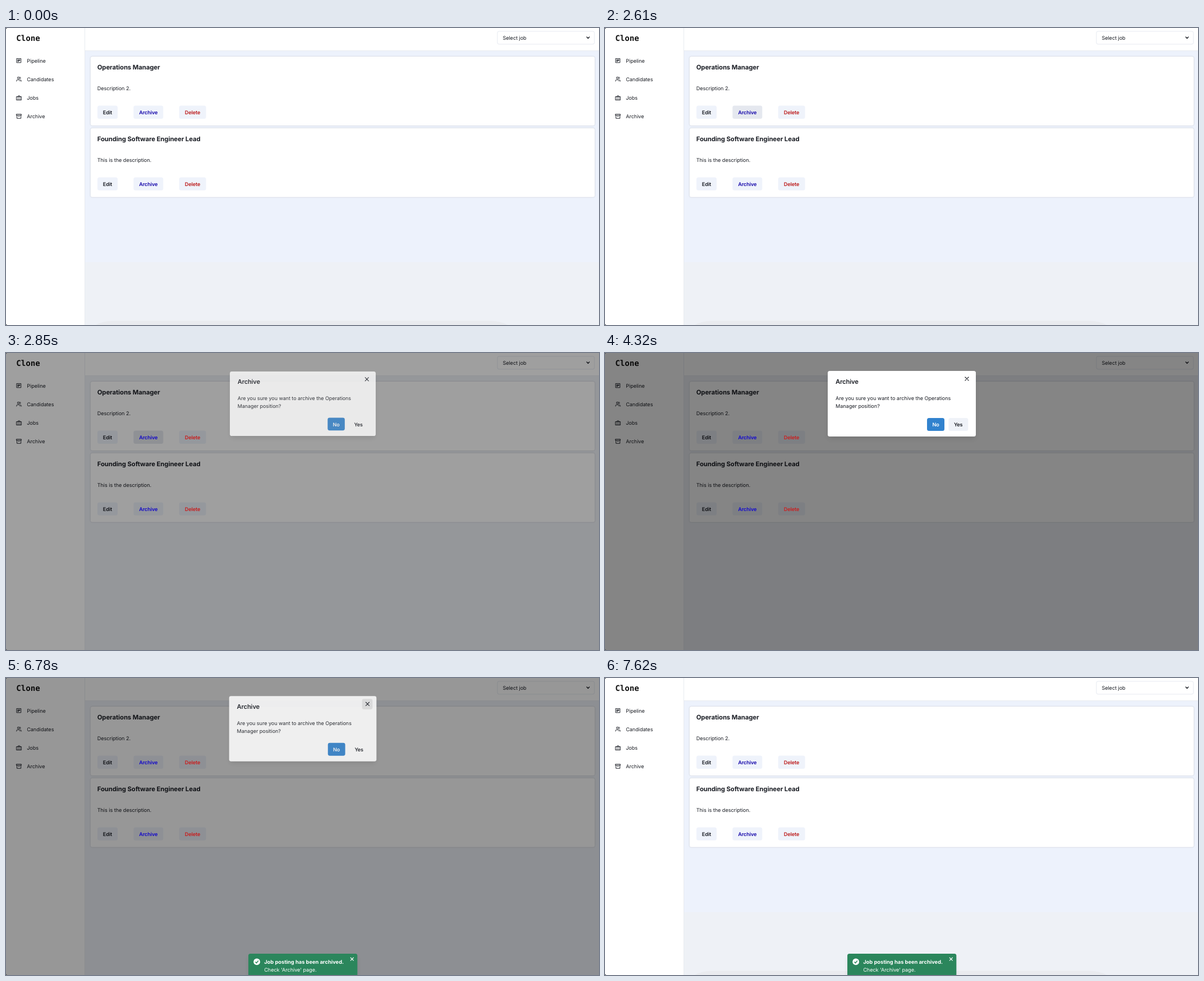
Write an HTML page that moves like this. It is 1057 px wide and 530 px high and loops after 8000 ms.

```html
<!DOCTYPE html>
<html lang="en">
<head>
<meta charset="utf-8">
<title>Job postings</title>
<style>
  html, body { margin: 0; width: 100%; height: 100%; overflow: hidden; background: #fff; }
  svg { display: block; width: 1057px; height: 530px; }
  text { font: 400 9.1px Inter, sans-serif; letter-spacing: -.035px; fill: #1a1d24; text-rendering: geometricPrecision; white-space: pre; }
  .b { font-weight: 600; letter-spacing: -.12px; }
  .h { font-size: 11.3px; font-weight: 700; letter-spacing: -.06px; }
  .title { font-size: 11.2px; font-weight: 600; letter-spacing: -.14px; }
  .alert { font-size: 9.3px; font-weight: 700; letter-spacing: 0; }
  .m { text-anchor: middle; }
  .logo { font: 700 14.1px "DejaVu Sans Mono", monospace; letter-spacing: 0; fill: #111; }
  .line { fill: none; stroke: #1a1d24; stroke-width: .95; stroke-linecap: round; stroke-linejoin: round; }
  .card { fill: #fff; filter: drop-shadow(0 .7px .8px rgba(0,0,0,.2)); }
  .btn { fill: #eff3fb; }
  .glow { filter: drop-shadow(0 5.9px 4.4px rgba(0,0,0,.12)); }
  #modal { transform-origin: 529px 90.5px; }
</style>
</head>
<body>
<svg viewBox="0 0 1057 530">
  <rect width="1057" height="530" fill="#fff"/>
  <rect id="ground" x="141" y="41" width="916" height="489"/>
  <g id="floor">
    <rect x="141" y="418" width="916" height="112" fill="#eef1f6"/>
    <path d="M160 530Q172 522.5 192 522.5H862Q882 522.5 894 530Z" fill="#e9ebef"/>
  </g>
  <path d="M140.5 0V530M141 40.5H1057" stroke="#e8ebf0" fill="none"/>

  <text class="logo" x="18.3" y="23">Clone</text>
  <g id="nav"></g>
  <g class="line">
    <path d="M19.3 54.5H26.7V61.8H19.3ZM21.3 56.6H22.4V59.8H21.3ZM23.9 56.6H24.9V58.2H23.9Z"/>
    <path d="M18.8 95V94.2Q18.8 92.4 20.6 92.4H23.3Q25.1 92.4 25.1 94.2V95M26 92.5Q27.5 93 27.5 95M24.6 87.4Q26 87.8 26 89.1T24.6 90.8"/>
    <circle cx="22" cy="89.1" r="1.7"/>
    <path d="M18.9 122.5H27.4V128.5H18.9ZM21.4 128.5V121.6Q21.4 120.9 22 120.9H24.2Q24.9 120.9 24.9 121.6V128.5"/>
    <path d="M18.8 153.8H27.3V155.8H18.8ZM19.5 155.8V161.3H26.6V155.8M22.2 157.7H23.9"/>
  </g>

  <rect x="875.9" y="5.9" width="173" height="23" rx="3" fill="#fff" stroke="#e6eaf1"/>
  <text x="885.4" y="20.7">Select job</text>
  <path class="line" d="M1035.2 16.1L1037.5 18.5L1039.8 16.1" style="stroke-width:1.4"/>

  <g id="cards"></g>
  <rect id="shade" width="1057" height="530"/>
  <g id="tints"></g>

  <g id="modal">
    <rect class="glow" x="399" y="34" width="260" height="113" rx="3.5" fill="#fff"/>
    <rect x="397" y="32" width="264" height="117" rx="3.5" fill="#fff"/>
    <text class="title" x="411" y="54.6">Archive</text>
    <text x="411" y="84">Are you sure you want to archive the Operations</text>
    <text x="411" y="98.1">Manager position?</text>
    <rect id="no" x="574" y="116" width="31" height="23" rx="3.5"/>
    <text class="b m" x="589.5" y="131.3" style="fill:#fff">No</text>
    <rect id="yes" x="612.3" y="116" width="35" height="23" rx="3.5" fill="#eff2f8"/>
    <text class="b m" x="629.7" y="131.3">Yes</text>
    <rect id="close" x="635.2" y="37" width="18.8" height="18.8" rx="3.5" fill-opacity=".09"/>
    <path class="line" d="M641.9 43L648.1 49.2M648.1 43L641.9 49.2" style="stroke-width:1.1"/>
  </g>

  <g id="toast">
    <rect class="glow" x="434" y="494" width="190" height="50" rx="3.5" fill="#2b865c"/>
    <rect x="432" y="492" width="194.3" height="56" rx="3.5" fill="#2b865c"/>
    <circle cx="447.1" cy="506.4" r="5.9" fill="#fff"/>
    <path d="M444.5 506.6L446.4 508.6L449.8 504.5" fill="none" stroke="#2b865c" stroke-width="1.4"/>
    <text class="alert" x="460.2" y="509.9" style="fill:#fff">Job posting has been archived.</text>
    <text x="460.2" y="524" style="fill:#fff">Check 'Archive' page.</text>
    <path d="M614.2 499L619.4 504.2M619.4 499L614.2 504.2" stroke="#fff" stroke-width="1.1" stroke-linecap="round"/>
  </g>
  <path d="M0 0H2L0 2ZM0 530H2L0 528Z" fill="#555"/>
</svg>
<script>
const LOOP = 8000, TICK = 30;
const $ = id => document.getElementById(id);
const text = (x, y, s, cls = '') => `<text class="${cls}" x="${x}" y="${y}">${s}</text>`;

$('nav').innerHTML = ['Pipeline', 'Candidates', 'Jobs', 'Archive']
  .map((s, i) => text(37.2, 61.5 + i * 33.15, s)).join('');

const buttons = [['Edit', 163, 36], ['Archive', 227.3, 53], ['Delete', 308.6, 48]];
[['Operations Manager', 'Description 2.'], ['Founding Software Engineer Lead', 'This is the description.']]
  .forEach(([title, note], i) => {
    const y = 51 + i * 127.8;
    let card = `<rect class="card" x="150.7" y="${y}" width="898.8" height="123" rx="3.5"/>`
      + text(162.7, y + 23.2, title, 'h') + text(162.7, y + 60.1, note);
    buttons.forEach(([label, x, w]) => {
      card += `<rect class="btn" x="${x}" y="${y + 87.6}" width="${w}" height="23.4" rx="3.5"/>`;
      const word = text(x + w / 2, y + 102.8, label, 'b m ' + label);
      if (label === 'Edit') card += word;
      else $('tints').innerHTML += word;
    });
    $('cards').innerHTML += card;
  });
const hovered = document.querySelectorAll('.btn')[1];

const clamp = v => Math.min(1, Math.max(0, v));
const ramp = (t, start, end) => clamp((t - start) / (end - start));
const mix = (a, b, p) => `rgb(${a.map((v, i) => Math.round(v + (b[i] - v) * p))})`;

// cubic-bezier easing, solved by bisection
const bezier = (x1, y1, x2, y2) => x => {
  if (x <= 0 || x >= 1) return clamp(x);
  const at = (a, b, u) => 3 * a * u * (1 - u) ** 2 + 3 * b * u * u * (1 - u) + u ** 3;
  let lo = 0, hi = 1;
  for (let i = 0; i < 24; i++) {
    const mid = (lo + hi) / 2;
    if (at(x1, x2, mid) < x) lo = mid; else hi = mid;
  }
  return at(y1, y2, lo);
};
const easeOut = bezier(0, 0, .2, 1), easeIn = bezier(.4, 0, 1, 1), easeBoth = bezier(.4, 0, .2, 1);

function draw(t) {
  const enter = easeOut(ramp(t, 2764, 2964)), leave = easeIn(ramp(t, 6740, 6865));
  const shown = enter * (1 - leave);
  $('shade').style.opacity = .48 * shown;
  $('modal').style.opacity = shown;
  $('modal').style.transform = `scale(${1 - .07 * (1 - enter) - .034 * leave})`;
  $('floor').style.display = shown ? 'none' : '';
  $('ground').style.fill = shown ? '#eef1f7' : '#edf2fc';

  hovered.style.fill = t < 2610 ? '#eff3fb'
    : mix([229, 232, 239], [239, 243, 251], ramp(t, 2850, 3030));
  for (const el of document.querySelectorAll('.Archive')) el.style.fill = mix([20, 6, 170], [16, 6, 208], shown);
  for (const el of document.querySelectorAll('.Delete')) el.style.fill = mix([188, 26, 26], [204, 30, 30], shown);

  const pass = ramp(t, 3600, 3720) - ramp(t, 3720, 3840);
  $('no').style.fill = mix([49, 130, 206], [43, 108, 176], pass);
  $('yes').style.opacity = ramp(t, 3690, 3900) - ramp(t, 5520, 5730);
  $('close').style.opacity = ramp(t, 5580, 5790);

  const rise = easeBoth(ramp(t, 4515, 4890));
  $('toast').style.opacity = rise;
  $('toast').style.transform = `translateY(${14 * (1 - rise)}px)`;
}

const begin = performance.now();
function frame() {
  const t = (performance.now() - begin) % LOOP;
  draw(Math.floor(t / TICK) * TICK);
  requestAnimationFrame(frame);
}
frame();
</script>
</body>
</html>
```
